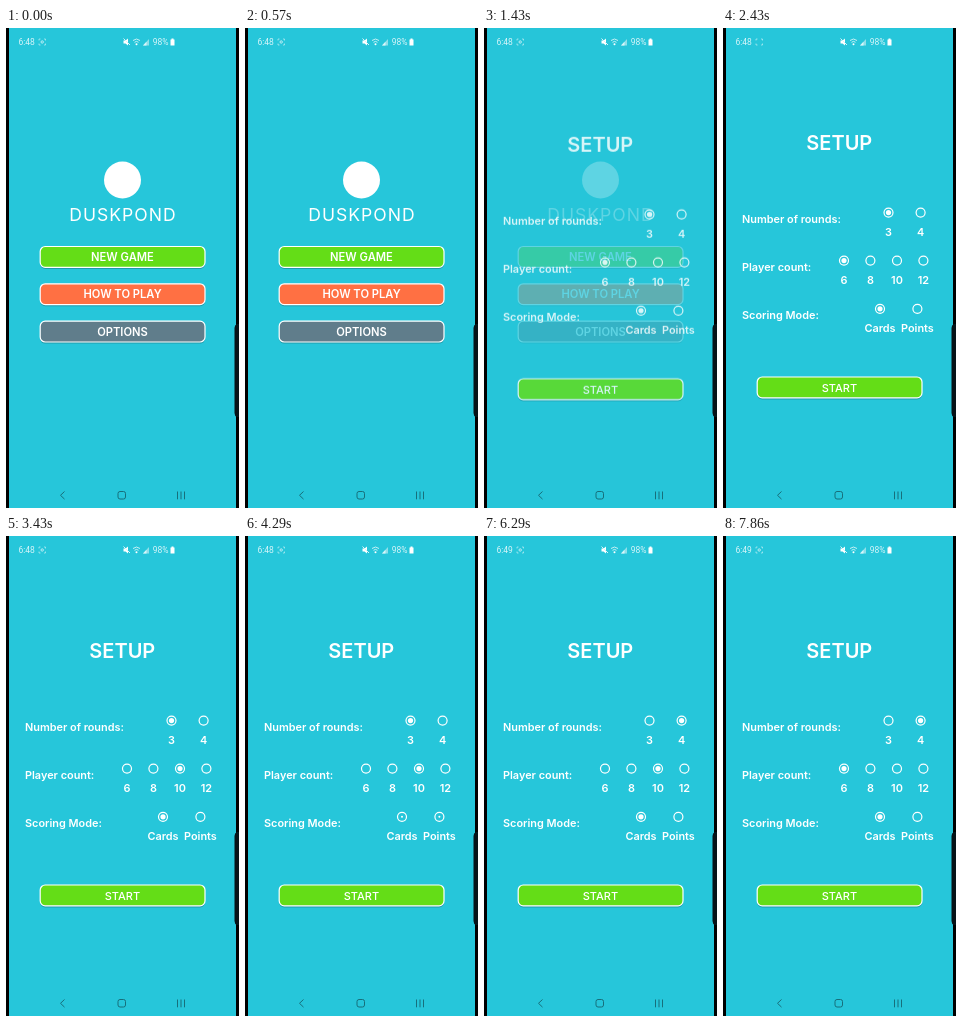
Write an HTML page that moves like this. It is 233 px wide and 480 px high and loops after 8 s.

```html
<!DOCTYPE html>
<html lang="en">
<head>
<meta charset="utf-8">
<title>Game setup</title>
<style>
  html, body { margin: 0; width: 100%; height: 100%; overflow: hidden; background: #000; }
  svg { display: block; width: 100%; height: 100%; }
  text { fill: #fff; font-family: Inter, sans-serif; font-weight: 600; }
  .mid { text-anchor: middle; }
  .label { font-size: 10.9px; }
  .button { font-size: 11.2px; }
  .start { font-size: 11px; font-weight: 500; }
  .status { font: 8.5px Roboto, sans-serif; fill: #d9f5f9; }
  .line { fill: none; stroke: #d9f5f9; }
  .nav { fill: none; stroke: #176f7b; stroke-width: 1; }
</style>
</head>
<body>
<svg viewBox="0 0 233 480">
  <rect width="233" height="480" fill="#000"/>
  <rect x="3" width="227" height="480" fill="#26c6da"/>

  <g id="menu">
    <circle cx="116.5" cy="152" r="18.5" fill="#fff"/>
    <text class="mid" x="117" y="193" font-size="17.6" letter-spacing="1" style="font-weight:400">DUSKPOND</text>
  </g>

  <g id="setup">
    <rect id="backdrop" x="3" width="227" height="480" fill="#26c6da"/>
    <g id="form">
      <text class="mid" x="116.3" y="122.3" font-size="20">SETUP</text>
    </g>
  </g>

  <g id="status">
    <text class="status" id="clock" x="12.5" y="17">6:48</text>
    <path class="line" d="M33 12.5v-1.5h1.5M38 11h1.5v1.5M39.5 15.5v1.5h-1.5M34.5 17h-1.5v-1.5" stroke-width=".6"/>
    <circle class="line" id="focus" cx="36.2" cy="14" r="1.2" stroke-width=".8"/>
    <path d="M117.500 12.500h2l2.500-2v7l-2.500-2h-2z" fill="#fff"/>
    <path class="line" d="M117.500 10.500l6.500 6.500" stroke-width="1"/>
    <path class="line" d="M127 12.500q3.500-3 7 0M128.500 14.300q2-1.800 4 0" stroke-width=".9"/>
    <circle cx="130.500" cy="16.300" r="1" fill="#fff"/>
    <path d="M137 17.500l6-6.500v6.500z" fill="#8fe0ea"/>
    <path d="M137 17.500l3.500-3.800v3.800z" fill="#d9f5f9"/>
    <text class="status" x="146.800" y="17">98%</text>
    <path d="M164.500 11.500h1v-1h2v1h1v6h-4z" fill="#fff"/>
  </g>

  <path class="nav" d="M58.500 463.500l-4 3.800 4 3.800M171.500 463.500v7.800M175 463.500v7.800M178.500 463.500v7.800"/>
  <rect class="nav" x="112" y="463.500" width="7.500" height="7.500" rx="2"/>
  <path d="M233 296h-2q-2.500 1-2.500 4v85q0 3 2.500 4h2z" fill="#061318"/>
</svg>
<script>
  const DURATION = 8000, FRAMES = 56;
  const byId = id => document.getElementById(id);

  function add(parent, tag, attrs, text = '') {
    const node = document.createElementNS('http://www.w3.org/2000/svg', tag);
    for (const key in attrs) node.setAttribute(key, attrs[key]);
    node.textContent = text;
    return parent.appendChild(node);
  }

  function button(parent, y, color, label, extra = '') {
    const box = { x: 34.2, width: 164.8, height: 20.8, rx: 5 };
    add(parent, 'rect', { ...box, y: y + 1.6, fill: '#176c78', opacity: .5 });
    add(parent, 'rect', { ...box, y, fill: color, stroke: '#fff', 'stroke-width': 1.2 });
    add(parent, 'text', { class: 'mid button ' + extra, x: 116.5, y: y + 14.5 }, label);
  }

  button(byId('menu'), 218.5, '#64dd17', 'NEW GAME');
  button(byId('menu'), 255.8, '#ff7043', 'HOW TO PLAY');
  button(byId('menu'), 293.2, '#607d8b', 'OPTIONS');
  button(byId('form'), 349, '#64dd17', 'START', 'start');

  // picks: [frame of the tap, chosen option]
  const groups = [
    { title: 'Number of rounds:', y: 184.6, xs: [165.5, 197.6], names: ['3', '4'],
      picks: [[0, 0], [36, 1]] },
    { title: 'Player count:', y: 232.6, xs: [121, 147.4, 174, 200.4], names: ['6', '8', '10', '12'],
      picks: [[0, 0], [23, 2], [50, 0]] },
    { title: 'Scoring Mode:', y: 280.8, xs: [157, 194.4], names: ['Cards', 'Points'],
      picks: [[0, 0], [30, 1], [40, 0]] }
  ];

  for (const group of groups) {
    const form = byId('form'), { y } = group;
    add(form, 'text', { class: 'label', x: 19, y: y + 10.2 }, group.title);
    group.dots = group.xs.map((x, i) => {
      add(form, 'circle', { cx: x, cy: y, r: 4.5, fill: 'none', stroke: '#fff', 'stroke-width': 1.2 });
      add(form, 'text', { class: 'mid label', x, y: y + 23.4 }, group.names[i]);
      return add(form, 'circle', { cx: x, cy: y, r: 0, fill: '#fff' });
    });
  }

  function drawDots({ picks, dots }, frame) {
    const last = picks.findLastIndex(([at]) => at <= frame);
    const [at, chosen] = picks[last];
    const changing = last > 0 && at === frame;
    dots.forEach((dot, i) => {
      const leaving = changing && picks[last - 1][1] === i;
      const radius = i === chosen || leaving ? (changing ? 1 : 2.6) : 0;
      dot.setAttribute('r', radius);
    });
  }

  function draw(now) {
    const frame = Math.floor((now % DURATION + 8) * FRAMES / DURATION) % FRAMES;
    const fading = frame === 10;
    byId('setup').setAttribute('opacity', frame < 10 ? 0 : 1);
    byId('backdrop').setAttribute('opacity', fading ? .74 : 1);
    byId('form').setAttribute('opacity', fading ? .82 : 1);
    byId('form').setAttribute('transform', `translate(0 ${fading ? 1.8 : 0})`);
    byId('focus').setAttribute('opacity', frame === 17 ? 0 : 1);
    byId('clock').textContent = frame < 36 ? '6:48' : '6:49';
    groups.forEach(group => drawDots(group, frame));
  }

  const start = performance.now();
  function tick() {
    draw(performance.now() - start);
    requestAnimationFrame(tick);
  }
  tick();
</script>
</body>
</html>
```
